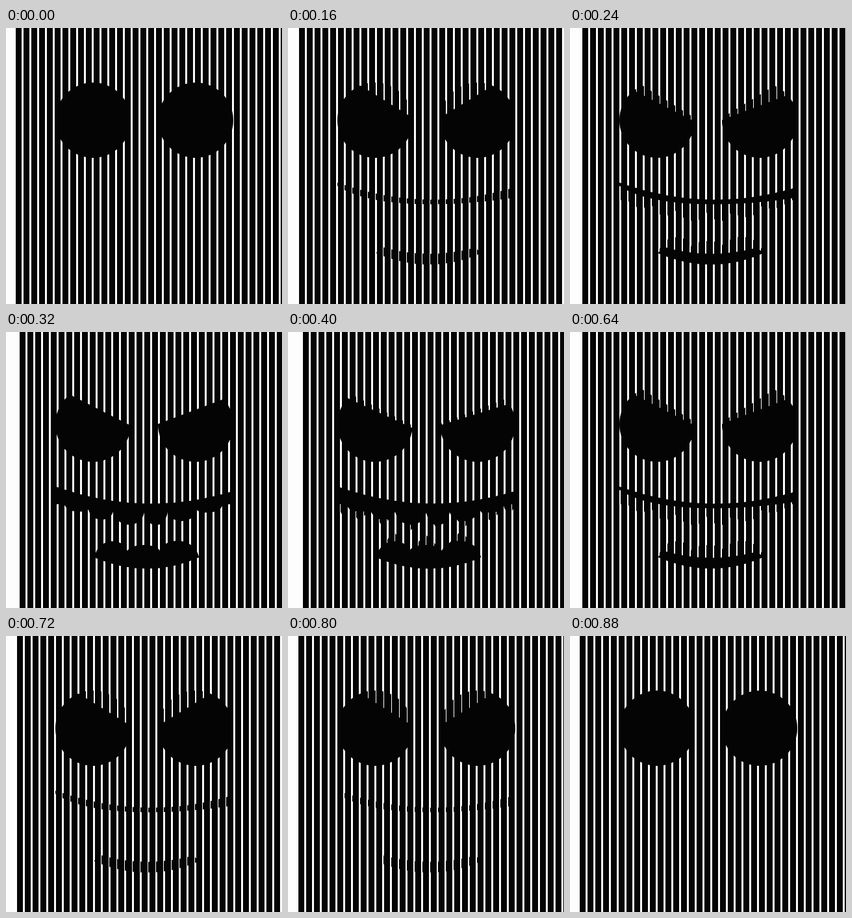
An HTML page with a canvas that plays this animation: 425 by 425 pixels, repeating every 0.96 s.

```html
<!DOCTYPE html>
<html>
<head>
<meta charset="utf-8">
<style>
html, body { margin: 0; width: 100%; height: 100%; overflow: hidden; background: #fdfdfd; }
canvas { display: block; }
</style>
</head>
<body>
<canvas id="stage" width="425" height="425"></canvas>
<script>
const SIZE = 425, PERIOD = 12, BAR = 9, SLICE = 3;
const STEP_MS = 80, STEPS = 12;
const BLACK = '#040404', WHITE = '#fdfdfd';
const RADIUS = 58, EYE_Y = 142, LEFT_EYE = 134, RIGHT_EYE = 292;
const MIDDLE = 213;

// Four expressions, from blank stare to bared fangs
const faces = [
  {},
  { leftLid: { y: 137, slope: 0.62 }, rightLid: { y: 137, slope: 0.61 }, mouth: true },
  { leftLid: { y: 143, slope: 0.51 }, rightLid: { y: 141, slope: 0.38 }, mouth: true, teeth: true },
  { leftLid: { y: 147, slope: 0.46 }, rightLid: { y: 143, slope: 0.31 }, mouth: true, teeth: true, fangs: true }
];

// Height that bends away from its middle value towards both sides
const arch = (y, bend) => x => y + bend * (x - MIDDLE) ** 2;

const upperTeeth = {
  gaps: [76, 92, 127, 165, 213, 249, 294, 332, 350],
  gum: arch(278, -0.0006), tip: arch(298, -0.002), fang: arch(306, -0.0014),
  close: upperLipTop
};
const lowerTeeth = {
  gaps: [137, 187, 237, 297],
  gum: arch(336, 0.0014), tip: arch(328, -0.0022), fang: arch(312, -0.0022),
  close: lowerLipBottom
};

function upperLipTop(ctx) {
  ctx.lineTo(350, 245);
  ctx.quadraticCurveTo(213, 287, 76, 238);
}

function lowerLipBottom(ctx) {
  ctx.lineTo(297, 347);
  ctx.bezierCurveTo(245, 370, 190, 370, 136, 347);
}

function drawLips(ctx) {
  ctx.beginPath();
  ctx.moveTo(76, 243);
  ctx.bezierCurveTo(130, 280, 260, 275, 350, 261);
  upperLipTop(ctx);
  ctx.fill();

  ctx.beginPath();
  ctx.moveTo(136, 346);
  ctx.lineTo(144, 337);
  ctx.quadraticCurveTo(215, 358, 289, 338);
  lowerLipBottom(ctx);
  ctx.fill();
}

function drawTeeth(ctx, { gaps, gum, tip, fang, close }, pointed) {
  ctx.beginPath();
  ctx.moveTo(gaps[0], gum(gaps[0]));
  for (let i = 1; i < gaps.length; i++) {
    const from = gaps[i - 1], to = gaps[i];
    const mid = (from + to) / 2, inset = (to - from) * 0.12;
    if (pointed) {
      ctx.lineTo(mid, fang(mid));
      ctx.lineTo(to, gum(to));
    } else {
      const base = (gum(from) + gum(to)) / 2;
      const pull = base + (tip(mid) - base) / 0.75;
      ctx.bezierCurveTo(from + inset, pull, to - inset, pull, to, gum(to));
    }
  }
  close(ctx);
  ctx.fill();
}

// Everything above the lid line, which rises from the inner corner, is cut off
function drawEye(ctx, x, lid, side) {
  ctx.save();
  if (lid) {
    const inner = MIDDLE + side * 23, outer = inner + side * 130;
    ctx.beginPath();
    ctx.moveTo(inner - side * 20, lid.y + lid.slope * 20);
    ctx.lineTo(outer, lid.y - lid.slope * 130);
    ctx.lineTo(outer, SIZE);
    ctx.lineTo(inner - side * 20, SIZE);
    ctx.clip();
  }
  ctx.beginPath();
  ctx.arc(x, EYE_Y, RADIUS, 0, Math.PI * 2);
  ctx.fill();
  ctx.restore();
}

function drawFace(ctx, face) {
  drawEye(ctx, LEFT_EYE, face.leftLid, -1);
  drawEye(ctx, RIGHT_EYE, face.rightLid, 1);
  if (face.mouth) drawLips(ctx);
  for (const row of [upperTeeth, lowerTeeth]) {
    if (face.teeth) drawTeeth(ctx, row, false);
    if (face.fangs) drawTeeth(ctx, row, true);
  }
}

// Interlace the four faces in narrow vertical slices
function buildArt() {
  const art = document.createElement('canvas');
  art.width = art.height = SIZE;
  const ctx = art.getContext('2d');
  ctx.fillStyle = BLACK;
  faces.forEach((face, n) => {
    ctx.save();
    ctx.beginPath();
    for (let x = n * SLICE; x < SIZE; x += PERIOD) ctx.rect(x, 0, SLICE, SIZE);
    ctx.clip();
    drawFace(ctx, face);
    ctx.restore();
  });
  return art;
}

// The bars start slowly, then slide two pixels per step, and return the same way
function barOffset(time) {
  const step = Math.floor(time / STEP_MS) % STEPS;
  const pos = Math.min(step, STEPS - 1 - step);
  return 15 + Math.max(pos, 2 * pos - 2);
}

const art = buildArt();
const stage = document.getElementById('stage').getContext('2d');

function draw(time) {
  stage.fillStyle = WHITE;
  stage.fillRect(0, 0, SIZE, SIZE);
  stage.drawImage(art, 0, 0);
  stage.fillStyle = BLACK;
  for (let x = barOffset(time); x < SIZE; x += PERIOD) stage.fillRect(x, 0, BAR, SIZE);
}

const start = performance.now();
function tick() {
  draw(performance.now() - start);
  requestAnimationFrame(tick);
}
tick();
</script>
</body>
</html>
```
